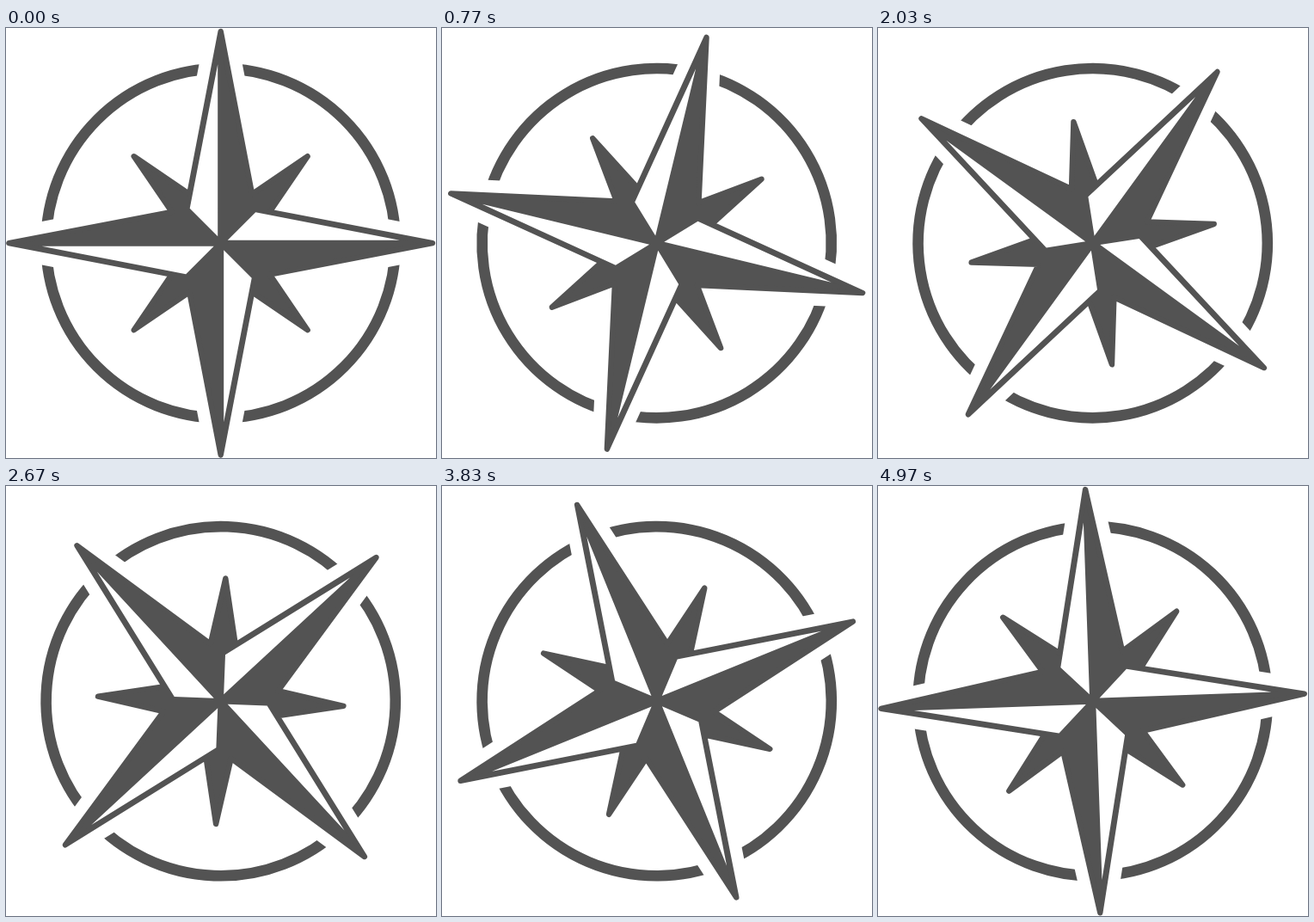
An HTML page that plays this animation: 500 by 500 pixels, repeating every 5.01 s.

```html
<!DOCTYPE html>
<html lang="en">
<head>
<meta charset="utf-8">
<title>Compass rose</title>
<style>
  html, body { margin: 0; width: 100%; height: 100%; overflow: hidden; background: #fff; }
  svg { display: block; width: 100%; height: 100%; }
  .ink { fill: #535353; stroke: #535353; stroke-width: 6.4; stroke-linejoin: round; }
  .gap { fill: none; stroke: #fff; stroke-width: 35; stroke-linejoin: round; }
  .ring { fill: none; stroke: #535353; stroke-width: 12.6; }
  .facet { fill: #fff; }
</style>
</head>
<body>
<svg viewBox="0 0 500 500">
  <g id="rose">
    <circle class="ring" r="203.1"/>
    <path class="gap" id="gap"/>
    <path class="ink" id="star"/>
    <path class="facet" id="facets"/>
  </g>
</svg>
<script>
  const LOOP = 5010, FRAMES = 150, STEP = 100 / 3, SWEEP = 88;
  const CENTER = '249.7 250.2';
  const byId = id => document.getElementById(id);

  // Rotates a point clockwise by a number of quarter turns.
  const turn = ([x, y], quarters) => quarters ? turn([-y, x], quarters - 1) : [x, y];
  const quarters = points => [0, 1, 2, 3].map(q => points.map(p => turn(p, q)));
  const path = points => 'M' + points.join('L') + 'Z';

  // One quarter of the star: long tip, notch, short tip, notch.
  const arm = [[0, -246.3], [36.4, -57], [101, -101], [57, -36.4]];
  const facet = [[-3.5, -208], [-3.5, -8], [-36, -40.5]];

  const outline = path(quarters(arm).flat());
  byId('star').setAttribute('d', outline);
  byId('gap').setAttribute('d', outline);
  byId('facets').setAttribute('d', quarters(facet).map(path).join(''));

  const rose = byId('rose');
  function draw(now) {
    const t = now % LOOP;
    const n = Math.min(FRAMES - 1, Math.floor((t + 5) / STEP));
    const angle = n * SWEEP / (FRAMES - 1);
    rose.setAttribute('transform', `translate(${CENTER}) rotate(${angle})`);
  }

  const start = performance.now();
  function tick() {
    draw(performance.now() - start);
    requestAnimationFrame(tick);
  }
  tick();
</script>
</body>
</html>
```
